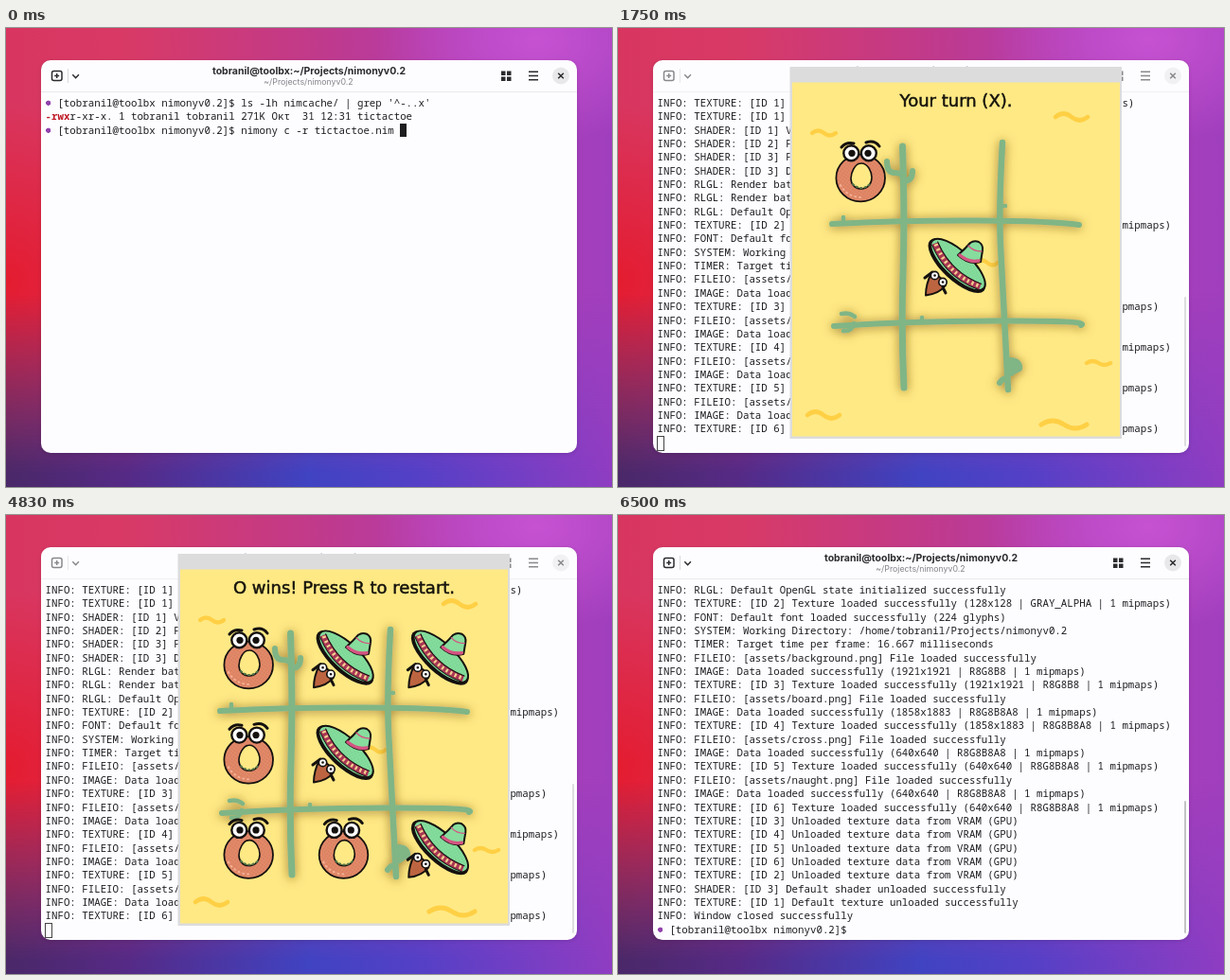
Animation, 640 px wide and 485 px high, one loop 6660 ms. Source, as an HTML page:

```html
<!DOCTYPE html>
<html lang="en">
<head>
<meta charset="utf-8">
<title>Tic-tac-toe in a terminal</title>
<style>
  html, body { margin: 0; width: 100%; height: 100%; overflow: hidden; }
  #stage {
    position: relative; width: 640px; height: 485px; overflow: hidden;
    background: radial-gradient(circle at 0 55%, #e41c30 0, #e41c3000 190px),
      radial-gradient(ellipse 170px 110px at 560px 12px, #c652d2, #c652d200),
      linear-gradient(to right, #d83660, #d83a66 20%, #c03a8c 52%, #ae3db4 78%, #a03fbe);
  }
  #stage::before {
    content: ""; position: absolute; inset: 0;
    background: linear-gradient(to right, #4a2868, #552a86 20%, #4043c2 50%, #5440c6 68%, #8f3dc2);
    -webkit-mask: linear-gradient(transparent 58%, #000 97%);
    mask: linear-gradient(transparent 58%, #000 97%);
  }
  #terminal {
    position: absolute; left: 37px; top: 34px; width: 565.5px; height: 414.5px;
    border-radius: 10px; background: #fdfcff; box-shadow: 0 1px 4px #0002;
  }
  #header { position: absolute; inset: 0 0 auto; height: 33px; border-bottom: 1px solid #e9e9ea; }
  #log {
    position: absolute; left: 4.5px; top: 37.8px; margin: 0; color: #1d1d20;
    font: 10.78px/14.36px "Noto Sans Mono", monospace;
  }
  #log b { color: #c01c28; }
  .dot, .block, .hollow { display: inline-block; width: 1ch; height: 14.36px; vertical-align: top; }
  .dot { background: radial-gradient(circle at 2.7px 7.2px, #9141ac 2.3px, #9141ac00 2.9px); }
  .block { background: #1d1d20; }
  .hollow { margin-left: -1px; border: 1px solid #444; }
  #scrollbar { position: absolute; left: 560.5px; width: 2.5px; bottom: 7px; border-radius: 2px; background: #c3c3c5; }
  svg { position: absolute; left: 0; top: 0; }
  #game { transform-box: view-box; }
  .title { font: bold 10.5px Inter, sans-serif; }
  .path { font: 8.8px Inter, sans-serif; fill: #85858a; }
  #message { font: 18px "DejaVu Sans", sans-serif; fill: #16140d; stroke: #16140d; stroke-width: .5; }
</style>
</head>
<body>
<div id="stage">
  <div id="terminal">
    <div id="header">
      <svg width="566" height="33" viewBox="37 34 566 33" fill="none" stroke="#2b2b2e" stroke-width="1.5">
        <rect x="48.5" y="45.5" width="10.5" height="10" rx="2"/>
        <path d="M53.7 48v5M51.2 50.5h5M70.3 49.3l3.3 3.4 3.3-3.4M552 46.3h10M552 50.5h10M552 54.7h10"/>
        <path d="M65.5 43v15" stroke="#d8d8da" stroke-width="1"/>
        <circle cx="586" cy="50.5" r="9" fill="#e8e8ea" stroke="none"/>
        <path d="M583.2 47.7l5.6 5.6m0-5.6l-5.6 5.6"/>
        <path d="M523 45.5h4.5v4.5h-4.5zM529 45.5h4.5v4.5h-4.5zM523 51.5h4.5v4.5h-4.5zM529 51.5h4.5v4.5h-4.5z" fill="#2b2b2e" stroke="none"/>
        <g text-anchor="middle" stroke="none" fill="#2b2b2e">
          <text class="title" x="320" y="49.2">tobranil@toolbx:~/Projects/nimonyv0.2</text>
          <text class="path" x="319.5" y="59.5">~/Projects/nimonyv0.2</text>
        </g>
      </svg>
    </div>
    <pre id="log"></pre>
    <div id="scrollbar"></div>
  </div>

  <svg width="640" height="485" viewBox="0 0 640 485">
    <defs>
      <filter id="glow" x="-10%" y="-10%" width="120%" height="120%">
        <feDropShadow dx="0" dy="1" stdDeviation="5.5" flood-color="#7d5a1c" flood-opacity=".8"/>
      </filter>
      <pattern id="grain" width="3" height="3" patternUnits="userSpaceOnUse" patternTransform="rotate(35)">
        <circle cx="1" cy="1" r=".6" fill="#b9604a"/>
      </pattern>
      <pattern id="halftone" width="3" height="3" patternUnits="userSpaceOnUse" patternTransform="rotate(20)">
        <circle cx="1" cy="1" r=".6" fill="#58bd80"/>
      </pattern>

      <g id="naught" stroke="#15110f" stroke-linecap="round">
        <ellipse cx="256.2" cy="158.5" rx="25.8" ry="24.8" fill="#e38a69" stroke-width="1.8"/>
        <ellipse cx="256.2" cy="158.5" rx="24.5" ry="23.5" fill="url(#grain)" stroke="none"/>
        <path d="M235 166q7 13 23 13" fill="none" stroke="#f3b095" stroke-width="2" stroke-dasharray="1 4"/>
        <path d="M257 143c7 0 11 9 11 15s-4 12-11 12-11-5-11-11 4-16 11-16z" fill="#ffe985" stroke-width="1.6"/>
        <path d="M248 165q9 8 18 0" fill="none" stroke="#55784a" stroke-width="2" stroke-dasharray="1.5 3"/>
        <g fill="#fff" stroke-width="2.4">
          <circle cx="246.3" cy="132.3" r="8"/><circle cx="264.8" cy="132.3" r="8"/>
        </g>
        <g fill="#15110f" stroke="none">
          <circle cx="247" cy="132.3" r="3.6"/><circle cx="264" cy="132.3" r="3.6"/>
        </g>
        <path d="M236 126q5-6 13-4M262 121q9-3 14 4" fill="none" stroke-width="3"/>
      </g>

      <g id="cross" stroke="#15110f" stroke-linejoin="round" stroke-linecap="round">
        <path d="M331 259q11 3 15 13q-7 9-21 10.500q0-12 6-23.500z" fill="#bd6541" stroke-width="2"/>
        <path d="M324 264l8-6M343 274l3 6" stroke-width="3"/>
        <g transform="translate(359 250) rotate(43)" fill="none">
          <ellipse cy="1.5" rx="39" ry="15.5" fill="#15110f" stroke="none"/>
          <ellipse rx="37" ry="14" fill="#86dd9d" stroke-width="2"/>
          <ellipse rx="35" ry="12" fill="url(#halftone)" stroke="none"/>
          <path d="M-33 0Q0 15 33 1" stroke="#a83655" stroke-width="7" stroke-linecap="butt"/>
          <path d="M-32 0Q0 15 32 1" stroke="#f3cf8e" stroke-width="4" stroke-linecap="butt" stroke-dasharray="2.2 3"/>
          <path d="M-34 3.500Q0 19 34 4.500M-32-3Q0 11 32-2" stroke-width="1"/>
        </g>
        <path d="M359 240q8-7 13-13 4-3 9-1 5 3 4 9l-2 12q-12 4-24-7z" fill="#86dd9d" stroke-width="2"/>
        <path d="M361 240q9 8 20 6" fill="none" stroke="#d45482" stroke-width="3.500"/>
        <path d="M370 230q5 6 14 6" fill="none" stroke="#d45482" stroke-width="1.3"/>
        <g fill="#fff" stroke-width="1.7">
          <circle cx="334.5" cy="261.5" r="4.2"/><circle cx="343" cy="268.5" r="4.2"/>
        </g>
        <path d="M334.5 261.5h.1M343 268.5h.1" stroke-width="2.6"/>
      </g>
    </defs>

    <g id="game">
      <rect x="181.5" y="41" width="350.5" height="393" fill="#dcdcdd"/>
      <rect x="184" y="57.5" width="346" height="374" fill="#ffe985"/>
      <g id="squiggles" fill="none" stroke="#ffd045" stroke-linecap="round"></g>
      <g filter="url(#glow)" fill="none" stroke="#80b586" stroke-width="6" stroke-linecap="round" stroke-linejoin="round">
        <path d="M300.5 125Q303 200 301 260T302 380" stroke-width="7"/>
        <path d="M406 121Q402 190 404 230T412 382" stroke-width="6.5"/>
        <path d="M226 207Q300 203 380 203.500T487 208M228 315Q300 310 400 309.500T489 314"/>
        <path d="M284 141q0 12 8 12t9 5M311 151q0 10-8 11" stroke-width="6"/>
        <path d="M236 302q8-2 14 3M238 320q9 1 11-8M238 200v5M321 306v3M408 188h1" stroke-width="4.5"/>
        <path d="M415 351q10 1 9 9-5 2-9 5zM403 375q4-6 8-4" fill="#80b586"/>
      </g>
      <text id="message" x="357" y="83" text-anchor="middle"></text>
      <g id="pieces"></g>
    </g>
  </svg>
</div>

<script>
const LOOP = 6660, FRAME = LOOP / 80;
const OPEN = 435, CLOSE = 5800, FADE = 150, LOGGED = 410, FINISHED = 5900;
const $ = id => document.getElementById(id);
const clamp = v => Math.max(0, Math.min(1, v));

// kind, column, row, time of the move
const moves = [
  ['cross', 1, 1, 1240], ['naught', 0, 0, 1320],
  ['cross', 1, 0, 2320], ['naught', 1, 2, 2400],
  ['cross', 2, 0, 3400], ['naught', 0, 2, 3480],
  ['cross', 2, 2, 4570], ['naught', 0, 1, 4650]
];
const WON = moves[moves.length - 1][3];

const home = { cross: 1, naught: 0 };
$('pieces').innerHTML = moves.map(([kind, col, row]) => {
  const x = (col - home[kind]) * 100.3, y = (row - home[kind]) * 100.3;
  return `<use href="#${kind}" x="${x}" y="${y}"/>`;
}).join('');
const pieces = [...$('pieces').children];

const squiggle = (x, y, w, h) =>
  `<path d="M${x} ${y}q${w / 4} ${-h} ${w / 2} 0t${w / 2} 0" stroke-width="${3.5 + w / 30}"/>`;
$('squiggles').innerHTML = [
  [205, 111, 25, 5], [462, 94, 34, 7], [379, 248, 22, 5],
  [495, 354, 25, 4], [200, 409, 34, 7], [447, 419, 48, 8]
].map(s => squiggle(...s)).join('');

const ok = 'loaded successfully';
const texture = (id, spec) => `TEXTURE: [ID ${id}] Texture ${ok} (${spec} | 1 mipmaps)`;
const asset = (id, name, spec) => [
  `FILEIO: [assets/${name}.png] File ${ok}`,
  `IMAGE: Data ${ok} (${spec} | 1 mipmaps)`,
  texture(id, spec)
];
const info = lines => lines.map(line => 'INFO: ' + line);
const startLog = info([
  texture(1, '1x1 | R8G8B8A8'),
  `TEXTURE: [ID 1] Default texture ${ok}`,
  'SHADER: [ID 1] Vertex shader compiled successfully',
  'SHADER: [ID 2] Fragment shader compiled successfully',
  `SHADER: [ID 3] Program shader ${ok}`,
  `SHADER: [ID 3] Default shader ${ok}`,
  `RLGL: Render batch vertex buffers ${ok} in RAM (CPU)`,
  `RLGL: Render batch vertex buffers ${ok} in VRAM (GPU)`,
  'RLGL: Default OpenGL state initialized successfully',
  texture(2, '128x128 | GRAY_ALPHA'),
  `FONT: Default font ${ok} (224 glyphs)`,
  'SYSTEM: Working Directory: /home/tobranil/Projects/nimonyv0.2',
  'TIMER: Target time per frame: 16.667 milliseconds',
  ...asset(3, 'background', '1921x1921 | R8G8B8'),
  ...asset(4, 'board', '1858x1883 | R8G8B8A8'),
  ...asset(5, 'cross', '640x640 | R8G8B8A8'),
  ...asset(6, 'naught', '640x640 | R8G8B8A8')
]);
const endLog = info([
  ...[3, 4, 5, 6, 2].map(id => `TEXTURE: [ID ${id}] Unloaded texture data from VRAM (GPU)`),
  'SHADER: [ID 3] Default shader unloaded successfully',
  'TEXTURE: [ID 1] Default texture unloaded successfully',
  'Window closed successfully'
]);

const block = '<i class="block"></i>', hollow = '<i class="hollow"></i>';
const prompt = '<i class="dot"></i> [tobranil@toolbx nimonyv0.2]$ ';
const command = [
  prompt + "ls -lh nimcache/ | grep '^-..x'",
  '<b>-rwx</b>r-xr-x. 1 tobranil tobranil 271K Οκτ  31 12:31 tictactoe',
  prompt + 'nimony c -r tictactoe.nim '
].join('\n');

function terminalText(t) {
  if (t < 249) return command + block;
  if (t < LOGGED) return command + '\n' + block;
  if (t < FINISHED) return [...startLog, hollow].join('\n');
  return [...startLog.slice(8), ...endLog, prompt + (t < 6490 ? block : '')].join('\n');
}

let shownText;
function draw(t) {
  const text = terminalText(t);
  if (text !== shownText) $('log').innerHTML = shownText = text;
  $('scrollbar').style.height = (t < LOGGED ? 0 : t < FINISHED ? 158 : 140) + 'px';

  const dim = clamp((t - 500) / 200) - clamp((t - FINISHED) / 200);
  $('header').style.opacity = $('scrollbar').style.opacity = 1 - 0.45 * dim;

  const opened = 1 - 2 ** (-10 * clamp((t - OPEN) / FADE));
  const closed = 1 - (1 - clamp((t - CLOSE) / FADE)) ** 2;
  const closing = t > CLOSE;
  const game = $('game').style;
  game.display = t > OPEN && closed < 1 ? '' : 'none';
  game.opacity = closing ? 1 - closed : opened;
  game.transformOrigin = closing ? '357px 237px' : '357px 424px';
  game.transform = `scale(${closing ? 1 - 0.2 * closed : t > OPEN + FADE ? 1 : opened})`;

  $('message').textContent = t < WON ? 'Your turn (X).' : 'O wins! Press R to restart.';
  pieces.forEach((piece, i) => piece.style.display = t < moves[i][3] ? 'none' : '');
}

const start = performance.now();
function tick() {
  const t = (performance.now() - start) % LOOP;
  draw(Math.floor(t / FRAME) * FRAME);
  requestAnimationFrame(tick);
}
tick();
</script>
</body>
</html>
```
